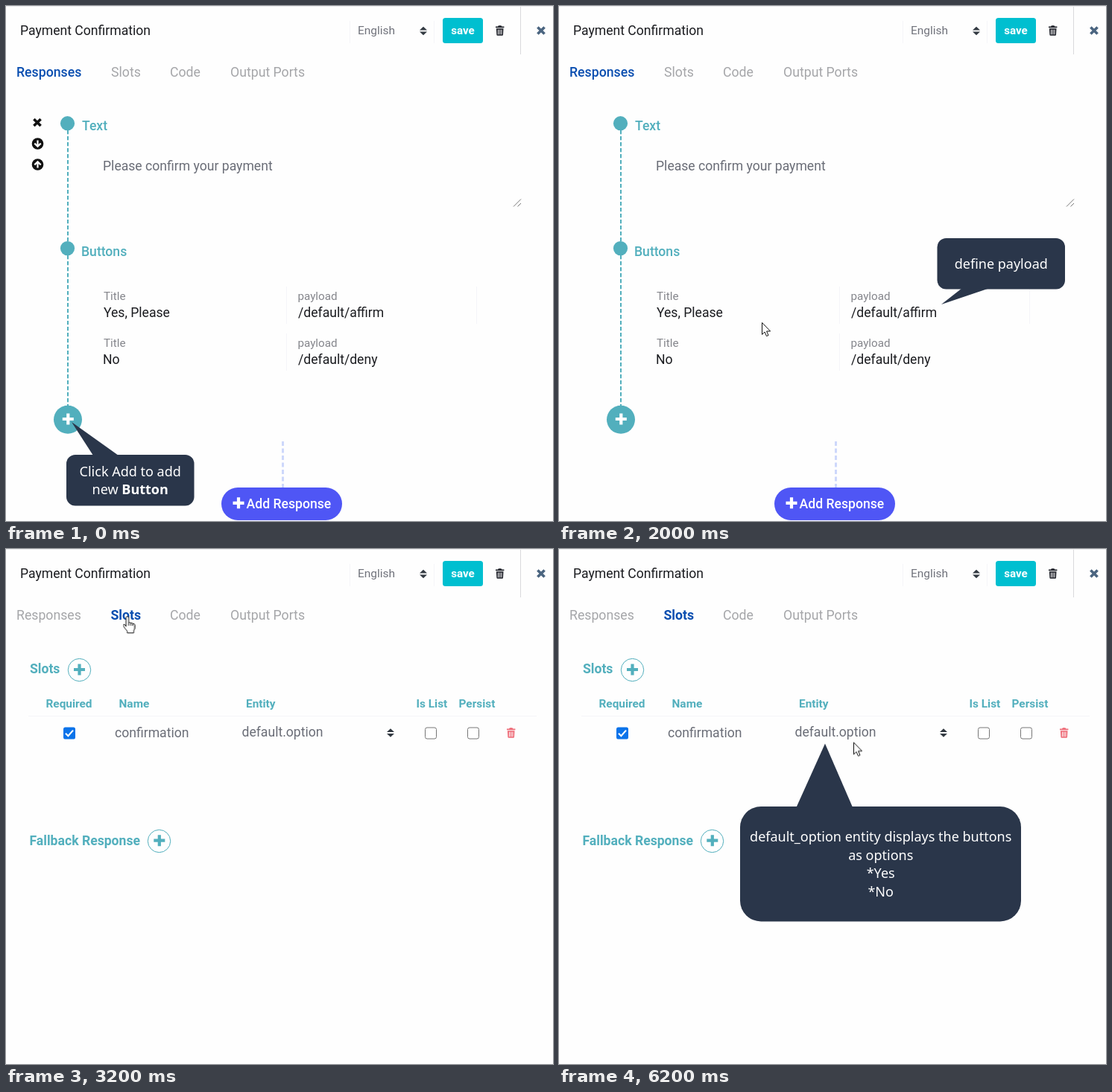
Recreate the animation shown at these times as an HTML page. Size 734x692 px, loop 6.8 s.

```html
<!DOCTYPE html>
<html lang="en">
<head>
<meta charset="utf-8">
<title>Payment Confirmation</title>
<style>
  html, body { margin: 0; width: 100%; height: 100%; overflow: hidden; background: #fefefe; }
  svg { display: block; width: 734px; height: 692px; font: 17.6px Roboto, sans-serif; }
  .tab { font-size: 17.7px; fill: #a5a6a9; }
  .on { font-weight: 500; fill: #0a4eb0; }
  .small { font-size: 15.2px; fill: #85868c; }
  .field { fill: #6a6d77; }
  .teal { fill: #52afbd; }
  .head { font-weight: 500; }
  .bold { font-weight: 700; }
  .cols { font-size: 15.4px; font-weight: 700; }
  .faint { stroke: #f5f5f8; }
  .callout { fill: #2a364a; }
  .callout text { font: 18px "Noto Sans", sans-serif; fill: #fff; text-anchor: middle; }
  .box { fill: #fff; stroke: #767676; }
  .pointer { fill: #fff; stroke: #111; stroke-linejoin: round; }

  /* one loop, hard cuts on a 200 ms grid */
  .anim { animation: 6.8s step-end infinite; visibility: hidden; }
  #replies { animation-name: replies; }
  #slots { animation-name: slots; }
  #hover, #addTip { animation-name: early; }
  #titleTip { animation-name: title; }
  #payloadTip { animation-name: payload; }
  #entityTip { animation-name: entity; }
  #arrow { animation-name: arrow; }
  #hand { animation-name: hand; }
  @keyframes replies { 0% { visibility: visible } 47.05%, 100% { visibility: hidden } }
  @keyframes slots { 0% { visibility: hidden } 47.05%, 100% { visibility: visible } }
  @keyframes early { 0% { visibility: visible } 26.47%, 100% { visibility: hidden } }
  @keyframes title { 0% { visibility: hidden } 2.94% { visibility: visible } 29.41%, 100% { visibility: hidden } }
  @keyframes payload { 0% { visibility: hidden } 14.7% { visibility: visible } 41.17%, 100% { visibility: hidden } }
  @keyframes entity { 0% { visibility: hidden } 73.52%, 100% { visibility: visible } }
  @keyframes arrow {
    0% { visibility: hidden; transform: translate(269px, 526px) }
    23.52% { visibility: visible; transform: translate(269px, 526px) }
    26.47% { visibility: visible; transform: translate(270px, 510px) }
    29.41% { visibility: visible; transform: translate(272px, 425px) }
    32.35% { visibility: visible; transform: translate(273px, 322px) }
    35.29% { visibility: visible; transform: translate(215px, 155px) }
    38.23% { visibility: hidden; transform: translate(183px, 88px) }
    58.82% { visibility: visible; transform: translate(222px, 135px) }
    61.76% { visibility: visible; transform: translate(345px, 216px) }
    64.7% { visibility: visible; transform: translate(385.5px, 240px) }
    73.52% { visibility: visible; transform: translate(390.5px, 253px) }
    76.47% { visibility: visible; transform: translate(393px, 257px) }
    79.41%, 100% { visibility: visible; transform: translate(395px, 259.5px) }
  }
  @keyframes hand {
    0% { visibility: hidden; transform: translate(182.5px, 88px) }
    38.23% { visibility: visible; transform: translate(182.5px, 88px) }
    41.17% { visibility: visible; transform: translate(156.5px, 90px) }
    58.82%, 100% { visibility: hidden; transform: translate(156.5px, 90px) }
  }
</style>
</head>
<body>
<svg viewBox="0 0 734 692">
  <defs>
    <path id="sort" d="M-5-1 0-5.8 5-1ZM-5 1 0 5.8 5 1Z"/>
    <path id="trash" fill-rule="evenodd" d="M0 1.6H3L4 .2H7.4L8.4 1.6H11.4V3.2H0ZM.9 4.2H10.5L10 12.8Q9.9 13.8 9 13.8H2.4Q1.5 13.8 1.4 12.8ZM3 5.8V12.2H4V5.8ZM5.2 5.8V12.2H6.2V5.8ZM7.4 5.8V12.2H8.4V5.8Z"/>
    <path id="plus" d="M-7.5 0H7.5M0-7.5V7.5" fill="none" stroke-width="4.2"/>
    <path id="cross" d="M-4.6-4.6 4.6 4.6M4.6-4.6-4.6 4.6" fill="none" stroke-width="3.6"/>
    <g id="down">
      <circle r="7.8"/>
      <path d="M0-4.6V3.4M-4.2-.4 0 3.8 4.2-.4" fill="none" stroke="#fefefe" stroke-width="2.2"/>
    </g>
  </defs>

  <!-- header -->
  <path d="M0 .5H734" stroke="#ececee"/>
  <path d="M690.5 1V65" stroke="#d9dadc"/>
  <path class="faint" d="M461.5 20V50M574.5 20V50"/>
  <text x="19" y="39" fill="#1b1c20">Payment Confirmation</text>
  <text x="472" y="38.3" font-size="15.5" fill="#70727b">English</text>
  <use href="#sort" x="560" y="33.5" fill="#333a42"/>
  <rect x="586" y="16" width="54" height="34" rx="3.5" fill="#00bfd0"/>
  <text x="613" y="38" font-size="15.2" class="bold" fill="#fff" text-anchor="middle">save</text>
  <use href="#trash" x="657" y="26" fill="#22242c"/>
  <use href="#cross" x="718" y="33" stroke="#4b6580"/>
  <text class="tab" x="220" y="95">Code</text>
  <text class="tab" x="301" y="95">Output Ports</text>

  <g id="replies" class="anim">
    <text class="tab on" x="14" y="95">Responses</text>
    <text class="tab" x="141" y="95">Slots</text>

    <path d="M83 167V537" stroke="#52afbd" stroke-width="2" stroke-dasharray="5.2 2.8"/>
    <g class="teal">
      <circle cx="82.5" cy="157.7" r="9.6"/>
      <circle cx="82.5" cy="325.6" r="9.6"/>
      <circle cx="83" cy="555.7" r="19"/>
      <text class="head" x="102" y="167">Text</text>
      <text class="head" x="101" y="336">Buttons</text>
    </g>
    <use href="#plus" x="83.3" y="555" stroke="#fff"/>

    <text class="field" x="130" y="221">Please confirm your payment</text>
    <path d="M681 269.5 691 259.5M686.5 269.5 691 265" stroke="#777"/>

    <path class="faint" d="M376.5 377V427M631.5 377V427M376.5 440V490"/>
    <g class="small">
      <text x="131" y="394.6">Title</text>
      <text x="391.5" y="394.6">payload</text>
      <text x="131" y="457.6">Title</text>
      <text x="391.5" y="457.6">payload</text>
    </g>
    <g fill="#1b1c20">
      <text x="131" y="417.6">Yes, Please</text>
      <text x="392" y="417.6">/default/affirm</text>
      <text x="130" y="480.6">No</text>
      <text x="392" y="480.6">/default/deny</text>
    </g>

    <path d="M371.5 585V647" stroke="#ced8fb" stroke-width="3" stroke-dasharray="6 3.5"/>
    <rect x="289" y="647" width="162" height="44" rx="22" fill="#4f56f5"/>
    <use href="#plus" x="312" y="667.8" stroke="#fff"/>
    <text class="head" x="322.5" y="674.7" fill="#fff">Add Response</text>
  </g>

  <g id="hover" class="anim">
    <use href="#cross" x="42" y="156.5" stroke="#111"/>
    <use href="#down" x="42.5" y="185" fill="#111"/>
    <use href="#down" transform="translate(42.5 213) scale(1 -1)" fill="#111"/>
  </g>

  <g id="slots" class="anim">
    <text class="tab" x="14" y="95">Responses</text>
    <text class="tab on bold" x="140.5" y="95">Slots</text>

    <g class="teal bold">
      <text x="32" y="167">Slots</text>
      <text x="31.5" y="397.5">Fallback Response</text>
    </g>
    <g fill="#fefefe" stroke="#52afbd">
      <circle cx="98.5" cy="162.5" r="15.2"/>
      <circle cx="205.5" cy="392.5" r="15.2"/>
      <use href="#plus" x="98.5" y="162"/>
      <use href="#plus" x="205.8" y="391.7"/>
    </g>

    <g class="teal cols">
      <text x="53.5" y="212.5">Required</text>
      <text x="151.5" y="212.5">Name</text>
      <text x="322" y="212.5">Entity</text>
      <text x="550.5" y="212.5">Is List</text>
      <text x="607.5" y="212.5">Persist</text>
    </g>
    <path class="faint" d="M30 224.5H712"/>

    <rect x="77" y="239.5" width="16" height="16" rx="2.5" fill="#0b73ea"/>
    <path d="M80 247.8 83.4 251.2 90 243.6" fill="none" stroke="#fff" stroke-width="2.2"/>
    <text class="field" x="146" y="253">confirmation</text>
    <text class="field" x="316.5" y="252.2">default.option</text>
    <use href="#sort" x="516" y="247" fill="#333a42"/>
    <rect class="box" x="562.5" y="240" width="15" height="15" rx="2.5"/>
    <rect class="box" x="619.5" y="240" width="15" height="15" rx="2.5"/>
    <use href="#trash" x="672" y="240" fill="#ee6a76"/>
  </g>

  <!-- callouts -->
  <g id="addTip" class="anim callout">
    <rect x="81" y="603" width="171.5" height="68.5" rx="12"/>
    <path d="M88 559 117 604H151Z"/>
    <text x="166.7" y="631.8">Click Add to add</text>
    <text x="166.7" y="656.3">new <tspan font-weight="700">Button</tspan></text>
  </g>
  <g id="titleTip" class="anim callout">
    <rect x="235.5" y="266.5" width="171.5" height="68.5" rx="12"/>
    <path d="M228 353 268 334H306Z"/>
    <text x="321.3" y="295.3">Provide a button</text>
    <text x="321.3" y="319.8">title</text>
  </g>
  <g id="payloadTip" class="anim callout">
    <rect x="507.5" y="312" width="171.5" height="68.5" rx="12"/>
    <path d="M513 401 541 379H578Z"/>
    <text x="593.3" y="353">define payload</text>
  </g>
  <g id="entityTip" class="anim callout">
    <rect x="243" y="346" width="377" height="154.5" rx="28"/>
    <path d="M357 261.5 318.5 347H394Z"/>
    <text x="431.7" y="393.2">default_option entity displays the buttons</text>
    <text x="431.7" y="417.7">as options</text>
    <text x="431.7" y="442.2">*Yes</text>
    <text x="431.7" y="466.7">*No</text>
  </g>

  <!-- pointers -->
  <g id="arrow" class="anim pointer">
    <path d="M.5.5V16.4L4 13 6.5 18.6 9 17.5 6.6 12H11.6Z"/>
  </g>
  <g id="hand" class="anim pointer">
    <path d="M4.6 14.2V2.4a1.75 1.75 0 0 1 3.5 0V9.2q1.6-1.2 2.9.3q1.5-.8 2.5.6q2.6-.5 2.6 2.2v3.6q0 2-1.2 4v2.9H6.2v-2.5Q3.5 17.5 1 13.5Q.3 11.6 1.8 11.2Q3 11 4.6 14.2Z"/>
    <path d="M8.1 9.2V13M11 9.6V13M13.5 10.2V13.2" fill="none"/>
  </g>
</svg>
</body>
</html>
```
